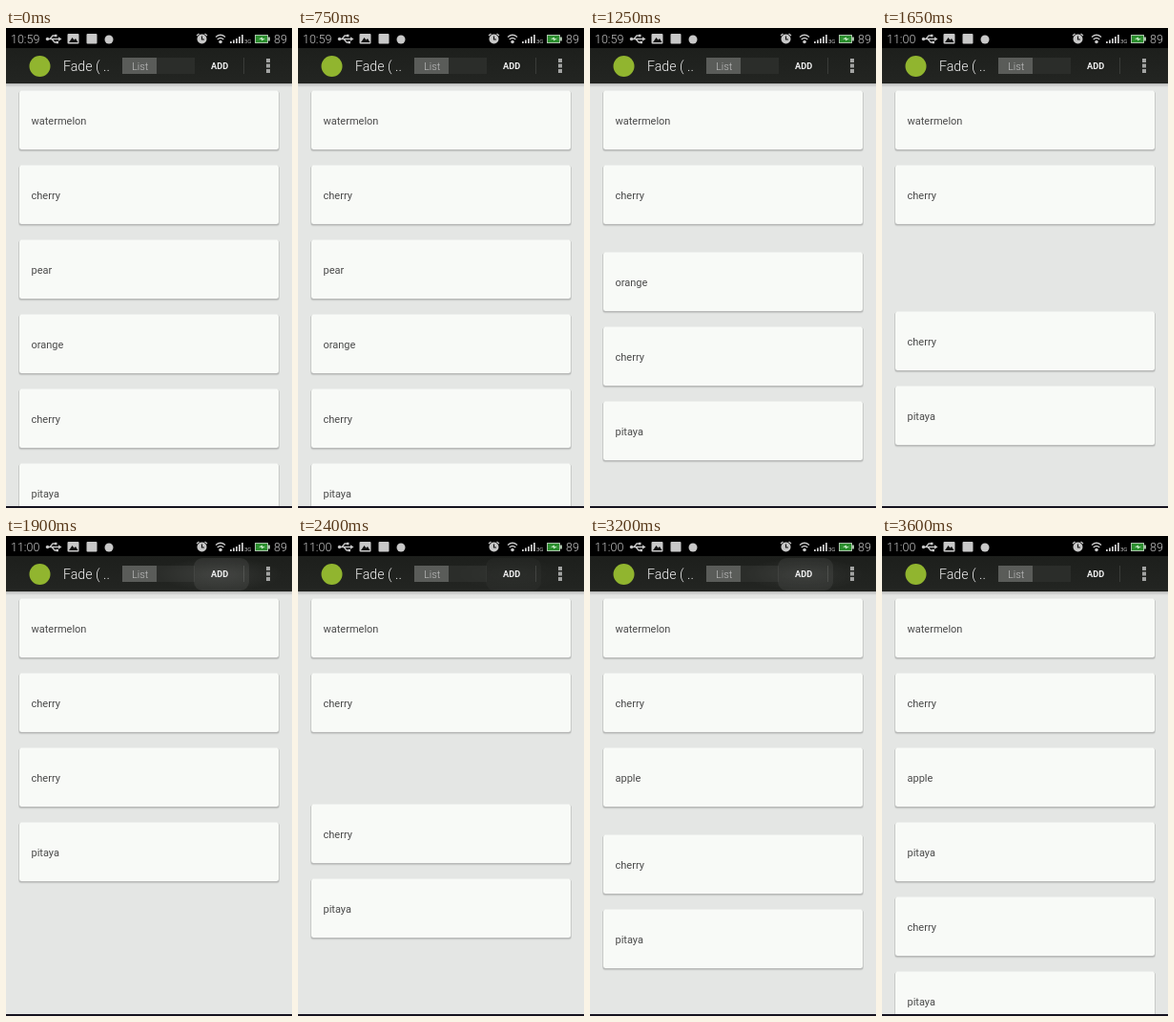
These frames come from a looping animation (300 by 502 pixels, 4.95 s). An HTML page:

```html
<!DOCTYPE html>
<html lang="en">
<head>
<meta charset="utf-8">
<style>
  html, body { margin: 0; width: 100%; height: 100%; overflow: hidden; background: #e4e6e4; }
  svg { display: block; width: 300px; height: 502px; font-family: Roboto, sans-serif; }
</style>
</head>
<body>
<svg viewBox="0 0 300 502">
  <rect width="300" height="502" fill="#e4e6e4"/>
  <g id="list"></g>

  <defs>
    <linearGradient id="shade" x2="0" y2="1">
      <stop stop-opacity=".2"/><stop offset="1" stop-opacity="0"/>
    </linearGradient>
    <linearGradient id="bar" x2="0" y2="1">
      <stop stop-color="#1d1f1c"/><stop offset="1" stop-color="#232522"/>
    </linearGradient>
    <radialGradient id="glow">
      <stop stop-color="#fff" stop-opacity=".09"/>
      <stop offset="1" stop-color="#fff" stop-opacity="0"/>
    </radialGradient>
  </defs>
  <rect y="58" width="300" height="4" fill="url(#shade)"/>
  <rect y="500" width="300" height="2" fill="#15131f"/>

  <!-- status bar -->
  <rect width="300" height="21" fill="#000"/>
  <g font-size="12.5" font-weight="300" fill="#c8c8c8">
    <text id="clock" x="5" y="16"></text>
    <text x="281" y="16">89</text>
  </g>
  <g fill="none" stroke="#c8c8c8" stroke-width="1.3">
    <path d="M43 11.5H56M46 11.5L49 8H51.5M48 11.5L51 15H53"/>
    <path d="M220 9.5Q225 5 230 9.500M221.700 12Q225 9 228.300 12"/>
    <path d="M200 8L202.500 6M211 8L208.500 6"/>
  </g>
  <g fill="#c8c8c8">
    <circle cx="43.500" cy="11.500" r="1.700"/>
    <path d="M55 9.300L58.500 11.500L55 13.700ZM51 6.800h2.500v2.500H51zM52.500 13.800h2.500v2.500h-2.500z"/>
    <rect x="64.500" y="6" width="12" height="10.500" rx="1"/>
    <rect x="84.500" y="6" width="11" height="10.500" rx="1"/>
    <circle cx="108" cy="12" r="4.500"/>
    <circle cx="205.500" cy="11.500" r="5"/>
    <circle cx="225" cy="14.500" r="1.800"/>
    <path d="M235 14h1.800v2h-1.800zM238 12.500h1.800V16h-1.800zM241 11h1.800v5h-1.800zM244 9h1.800v7h-1.800zM247 7h1.800v9h-1.800z"/>
    <text x="250" y="16" font-size="6">3G</text>
  </g>
  <path d="M66 15L69.500 10L71.500 12.500L73 11L75.500 15Z" fill="#111"/>
  <path d="M205.500 8.500V12H208" fill="none" stroke="#111" stroke-width="1.200"/>
  <rect x="261.500" y="7.500" width="13" height="8" fill="#2c8f2f" stroke="#a9c2a9"/>
  <rect x="275" y="9.500" width="2" height="4" fill="#a9c2a9"/>
  <path d="M265 11.500L269 9.500V11H272L268 13.500V12Z" fill="#bfe8bf"/>

  <!-- action bar -->
  <rect y="21" width="300" height="37" fill="url(#bar)"/>
  <circle cx="35.500" cy="40" r="11" fill="#91b52f"/>
  <text x="60" y="45" font-size="14.200" font-weight="300" fill="#f2f2f2">Fade ( ..</text>
  <rect x="122" y="31" width="76" height="17" fill="#2b2d2a"/>
  <rect x="122" y="31" width="36" height="17" fill="#5a5c59"/>
  <text x="132" y="44" font-size="11" font-weight="300" fill="#c2c2c2">List</text>
  <rect x="249" y="31" width="1" height="17" fill="#3a3c39"/>
  <g id="ripple">
    <ellipse cx="225" cy="40" rx="65" ry="18" fill="url(#glow)"/>
    <rect x="197" y="23" width="58" height="34" rx="9" fill="#fff" fill-opacity=".07"/>
  </g>
  <text x="215" y="43" font-size="9.200" font-weight="700" fill="#f2f2f2">ADD</text>
  <path d="M273 32h4v4h-4zM273 37.500h4v4h-4zM273 43h4v4h-4z" fill="#a2a3a2"/>
</svg>

<script>
const LOOP = 4950, PITCH = 78, TOP = 66, MOVE = 250, FADE = 120;
const $ = id => document.getElementById(id);
const ramp = (t, start, length) => Math.min(1, Math.max(0, (t - start) / length));
const ease = p => 0.5 - 0.5 * Math.cos(Math.PI * p);

// The moments at which the rows below start to slide
const shifts = [
  { at: 1067, by: -1 }, { at: 1619, by: -1 },
  { at: 2233, by: 1 }, { at: 3134, by: 1 }
];

// slot: starting row; moves: the shifts that affect the card
const cards = [
  { name: 'watermelon', slot: 0 },
  { name: 'cherry', slot: 1 },
  { name: 'pear', slot: 2, out: [860, 200] },
  { name: 'orange', slot: 3, moves: [0], out: [1490, FADE] },
  { name: 'cherry', slot: 4, moves: [0, 1, 2, 3] },
  { name: 'pitaya', slot: 5, moves: [0, 1, 2, 3] },
  { name: 'apple', slot: 2, in: [2233 + MOVE, FADE] },
  { name: 'pitaya', slot: 3, in: [3134 + MOVE, FADE] }
];

$('list').innerHTML = cards.map(c => `<g>
  <rect x="13" y="0" width="274" height="63.500" rx="3" fill-opacity=".06"/>
  <rect x="13.500" y="0" width="273" height="62.500" rx="2.500" fill-opacity=".14"/>
  <rect x="14" y="-.5" width="272" height="61.500" rx="2.500" fill="#f8faf7"/>
  <text x="26.500" y="35" font-size="11" fill="#4a4a4a">${c.name}</text></g>`).join('');
const nodes = [...$('list').children];

function draw(t) {
  cards.forEach((c, i) => {
    const row = (c.moves || []).reduce(
      (sum, k) => sum + shifts[k].by * ease(ramp(t, shifts[k].at, MOVE)), c.slot);
    const shown = (c.in ? ramp(t, ...c.in) : 1) - (c.out ? ramp(t, ...c.out) : 0);
    nodes[i].setAttribute('transform', `translate(0 ${Math.round(TOP + row * PITCH)})`);
    nodes[i].setAttribute('opacity', shown);
  });
  const press = ramp(t, 1800, 100) - ramp(t, 2200, 300)
              + ramp(t, 2600, 100) - ramp(t, 3150, 400);
  $('ripple').setAttribute('opacity', press);
  $('clock').textContent = t < 1300 ? '10:59' : '11:00';
}

function tick() {
  draw(performance.now() % LOOP);
  requestAnimationFrame(tick);
}
tick();
</script>
</body>
</html>
```
